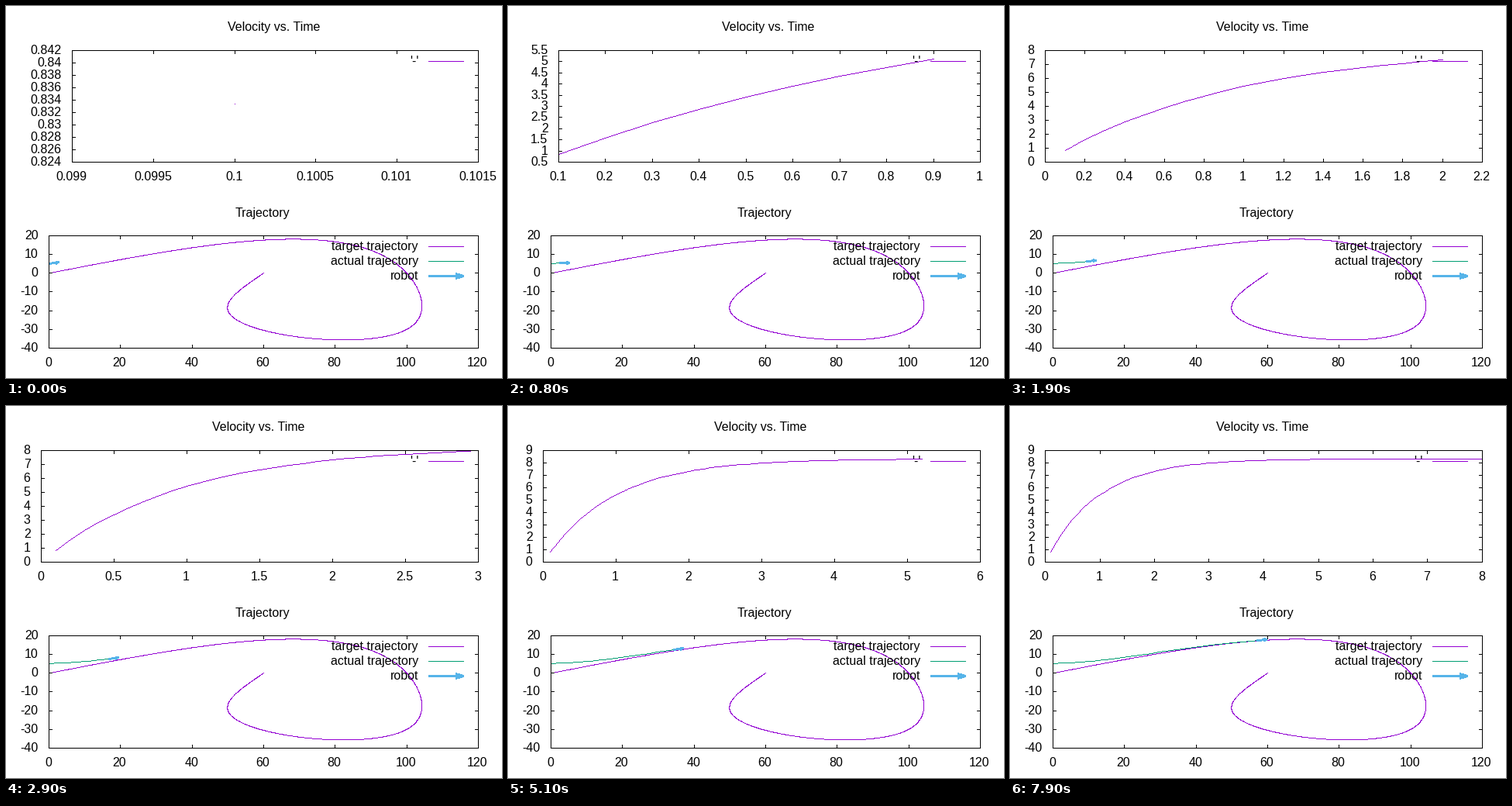
A matplotlib script that plays this animation: 640 px wide and 480 px high, repeating every 8 s.

```python
import math

import matplotlib.pyplot as plt
import numpy as np
from matplotlib.animation import FuncAnimation
from matplotlib.collections import LineCollection

DPI, FRAMES = 80, 80
PX = 72 / DPI
PURPLE, GREEN, BLUE = "#9400d3", "#009e73", "#56b4e9"
RIGHT = 609
DT, WHEELBASE, GAIN, SPEED = 0.1, 2.9, 0.5, 30 / 3.6
MAX_STEER = math.radians(30)

plt.rcParams.update({
    "font.family": "Liberation Sans",
    "font.size": 16 * PX,
    "path.simplify": False,
})


# ---------- path and vehicle model ----------

def natural_spline(s, a, u):
    """Value and slope of the natural cubic spline through (s, a) at u."""
    h, n = np.diff(s), len(s)
    A, b = np.eye(n), np.zeros(n)
    for i in range(1, n - 1):
        A[i, i - 1:i + 2] = h[i - 1], 2 * (h[i - 1] + h[i]), h[i]
        b[i] = 3 * ((a[i + 1] - a[i]) / h[i] - (a[i] - a[i - 1]) / h[i - 1])
    c = np.linalg.solve(A, b)
    d = np.diff(c) / (3 * h)
    m = np.diff(a) / h - h * (2 * c[:-1] + c[1:]) / 3
    i = np.clip(np.searchsorted(s, u, side="right") - 1, 0, n - 2)
    w = u - s[i]
    value = a[i] + m[i] * w + c[i] * w**2 + d[i] * w**3
    slope = m[i] + 2 * c[i] * w + 3 * d[i] * w**2
    return value, slope


def wrap(angle):
    return (angle + math.pi) % (2 * math.pi) - math.pi


def build_path():
    wx = np.array([0.0, 100, 100, 50, 60])
    wy = np.array([0.0, 0, -30, -20, 0])
    s = np.append(0, np.cumsum(np.hypot(np.diff(wx), np.diff(wy))))
    u = np.arange(0, s[-1], 0.1)
    cx, dx = natural_spline(s, wx, u)
    cy, dy = natural_spline(s, wy, u)
    return cx, cy, np.arctan2(dy, dx)


def drive(cx, cy, cyaw):
    """Stanley steering; returns rows of x, y, yaw, v after each step."""
    x, y, yaw, v, last = 0.0, 5.0, math.radians(20), 0.0, 0
    rows = []
    for _ in range(FRAMES):
        ex = x + WHEELBASE * math.cos(yaw) - cx
        ey = y + WHEELBASE * math.sin(yaw) - cy
        near = int(np.argmin(np.hypot(ex, ey)))
        error = ex[near] * math.sin(yaw) - ey[near] * math.cos(yaw)
        last = max(last, near)
        steer = wrap(cyaw[last] - yaw) + math.atan2(GAIN * error, v)
        steer = max(-MAX_STEER, min(MAX_STEER, steer))
        accel = SPEED - v
        x += v * math.cos(yaw) * DT
        y += v * math.sin(yaw) * DT
        yaw = wrap(yaw + v / WHEELBASE * math.tan(steer) * DT)
        v += accel * DT
        rows.append((x, y, yaw, v))
    return np.array(rows).T


cx, cy, cyaw = build_path()
rx, ry, ryaw, rv = drive(cx, cy, cyaw)
# single-precision clock: its rounding decides when the time axis grows
clock = np.add.accumulate(np.full(FRAMES, DT, dtype=np.float32)).astype(float)


# ---------- axis scaling ----------

def tic_step(span):
    power = 10.0 ** math.floor(math.log10(span))
    density = 20 / (span / power)
    for limit, tic in ((40, 0.05), (20, 0.1), (10, 0.2), (4, 0.5), (2, 1)):
        if density > limit:
            return tic * power
    return 2 * power


def auto_range(data):
    lo, hi = data.min(), data.max()
    if lo == hi:
        lo, hi = lo * 0.99, hi * 1.01
    step = tic_step(hi - lo)
    return step * math.floor(lo / step), step * math.ceil(hi / step), step


def tics(lo, hi, step):
    return [lo + i * step for i in range(round((hi - lo) / step) + 1)]


def label(value):
    return "%g" % (round(value, 9) + 0.0)


# ---------- drawing: integer coordinates are pixel centres ----------

fig = plt.figure(figsize=(640 / DPI, 480 / DPI), dpi=DPI, facecolor="white")
ax = fig.add_axes([0, 0, 1, 1])
ax.set_xlim(-0.5, 639.5)
ax.set_ylim(479.5, -0.5)
ax.axis("off")


def text(x, base, s, ha="center"):
    return ax.text(x - 0.5, base - 0.5, s, ha=ha, va="baseline", zorder=4)


def segments(segs, color, z, cap="butt"):
    lines = LineCollection(segs, colors=color, linewidths=PX,
                           capstyle=cap, zorder=z)
    lines.set_snap(False)
    return ax.add_collection(lines, autolim=False)


def stroke(xs, ys, color, width=1, z=2):
    """Polyline stepped over whole pixels, so its edges stay hard."""
    pts = np.rint(np.column_stack([xs, ys]))
    bars = {}
    for p, q in zip(pts, pts[1:] if len(pts) > 1 else pts):
        dx, dy = np.abs(q - p)
        n = int(max(dx, dy))
        half = (width / 2, 0) if dy > dx else (0, width / 2)
        for x, y in np.rint(np.linspace(p, q, n + 1)):
            bars[x, y] = half
    segs = [[(x - a, y - b), (x + a, y + b)] for (x, y), (a, b) in bars.items()]
    return segments(segs, color, z)


def arrow(x0, y0, x1, y1):
    dx, dy = x0 - x1, y0 - y1
    k = min(0.3, 10 / math.hypot(dx, dy))
    c, s = k * math.cos(math.pi / 12), k * math.sin(math.pi / 12)
    left = (x1 + c * dx - s * dy, y1 + s * dx + c * dy)
    right = (x1 + c * dx + s * dy, y1 - s * dx + c * dy)
    return [stroke([x0, x1], [y0, y1], BLUE, 3, 3),
            stroke([left[0], x1], [left[1], y1], BLUE, 3, 3),
            stroke([x1, right[0]], [y1, right[1]], BLUE, 3, 3)]


class Panel:
    """A bordered plot box with mirrored tics."""

    def __init__(self, left, top, bottom, xr, yr, title):
        self.left, self.top, self.bottom = left, top, bottom
        self.xr, self.yr, self.title = xr, yr, title

    def px(self, x):
        lo, hi, _ = self.xr
        return self.left + (np.asarray(x) - lo) / (hi - lo) * (RIGHT - self.left)

    def py(self, y):
        lo, hi, _ = self.yr
        return self.bottom - (np.asarray(y) - lo) / (hi - lo) * (self.bottom - self.top)

    def curve(self, xs, ys, color):
        return stroke(self.px(xs), self.py(ys), color)

    def frame(self):
        l, t, b = self.left, self.top, self.bottom
        segs = [[(l, t), (RIGHT, t)], [(l, b), (RIGHT, b)],
                [(l, t), (l, b)], [(RIGHT, t), (RIGHT, b)]]
        out = [text((l + RIGHT) / 2 - 1, b - 169, self.title)]
        for v in tics(*self.xr):
            x = round(float(self.px(v)))
            segs += [[(x, b), (x, b - 4)], [(x, t), (x, t + 4)]]
            out.append(text(x - 0.5, b + 24, label(v)))
        for v in tics(*self.yr):
            y = round(float(self.py(v)))
            segs += [[(l, y), (l + 4, y)], [(RIGHT, y), (RIGHT - 4, y)]]
            out.append(text(l - 13.5, y + 5, label(v), "right"))
        out.append(segments(segs, "black", 3.5, "projecting"))
        return out


def key(y, name, color=None):
    text(532, y + 5, name, "right")
    if color:
        stroke([545, 590], [y, y], color)
    else:
        arrow(545, y, 590, y)


track = Panel(55, 296, 441, (0, 120, 20), (-40, 20, 10), "Trajectory")
track.frame()
track.curve(cx, cy, PURPLE)
key(71, "'-'", PURPLE)
key(310, "target trajectory", PURPLE)
key(329, "actual trajectory", GREEN)
key(348, "robot")

moving = []


def update(k):
    while moving:
        moving.pop().remove()
    t, v = clock[:k + 1], rv[:k + 1]
    xr, yr = auto_range(t), auto_range(v)
    chars = max(len(label(y)) for y in tics(*yr))
    speed = Panel(35 + 10 * chars, 57, 201, xr, yr, "Velocity vs. Time")
    moving.extend(speed.frame())
    moving.append(speed.curve(t, v, PURPLE))
    moving.append(track.curve(rx[:k + 1], ry[:k + 1], GREEN))
    tip_x = rx[k] + WHEELBASE * math.cos(ryaw[k])
    tip_y = ry[k] + WHEELBASE * math.sin(ryaw[k])
    ends = track.px([rx[k], tip_x]), track.py([ry[k], tip_y])
    (x0, x1), (y0, y1) = np.rint(ends)
    moving.extend(arrow(x0, y0, x1, y1))
    return moving


anim = FuncAnimation(fig, update, frames=FRAMES, init_func=lambda: [],
                     interval=100, repeat=True, repeat_delay=0, blit=False)
plt.show()
```
